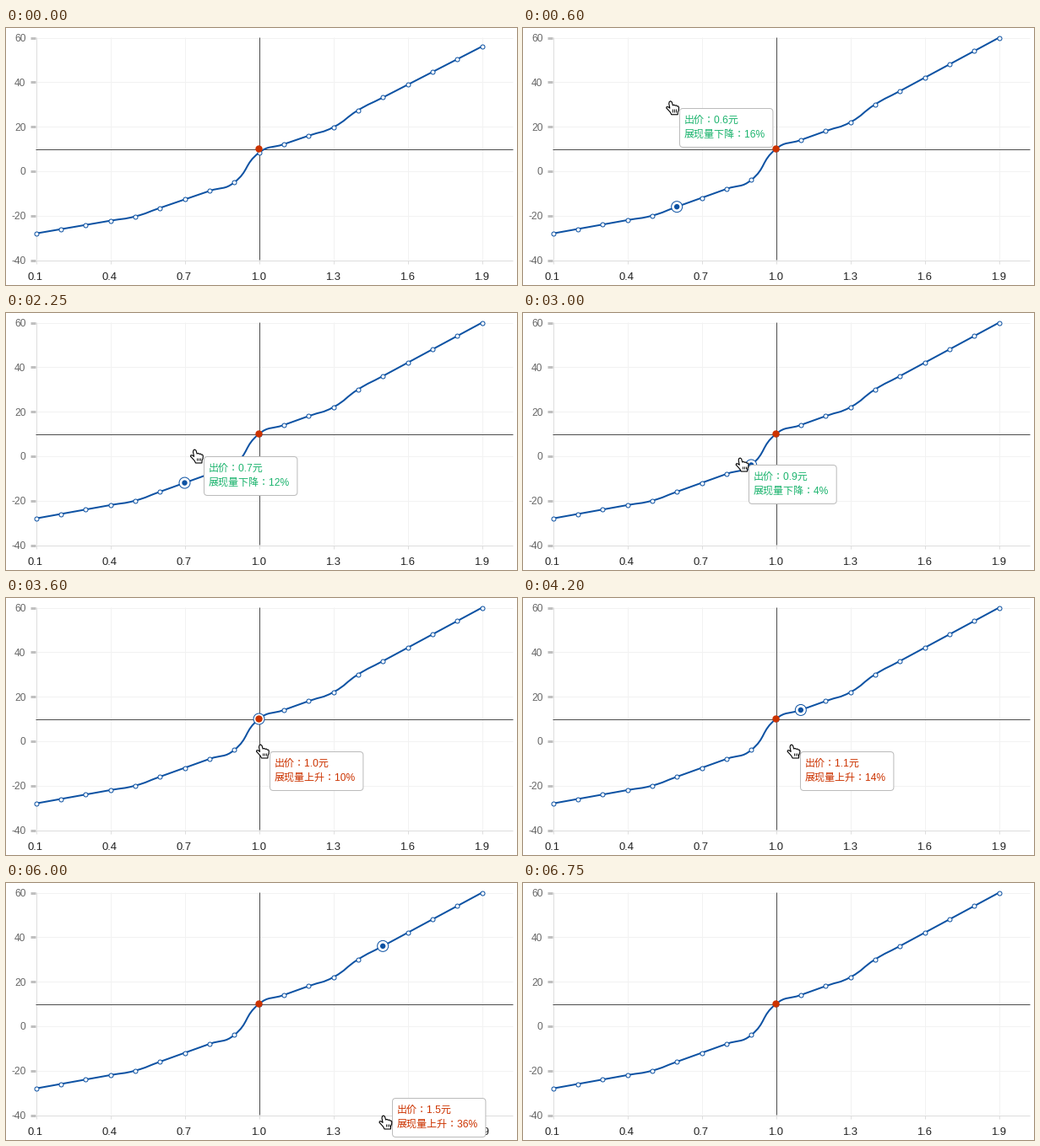
A matplotlib script that plays this animation: 605 by 305 pixels, repeating every 7.86 s.

```python
import numpy as np
import matplotlib.pyplot as plt
from matplotlib.animation import FuncAnimation
from matplotlib.patches import Circle, FancyBboxPatch, PathPatch, Polygon
from matplotlib.path import Path

W, H, DPI = 605, 305, 64
PX = 72 / DPI  # points per pixel
LOOP, INTERVAL, STEP = 7860, 30, 150

BLUE, RED, GREEN = "#0d52a3", "#cc3300", "#1cb46e"
DARK, GRID = "#4d4d4d", "#f2f2f2"

VALUES = np.array([-28, -26, -24, -22, -20, -16, -12, -8, -4, 10,
                   14, 18, 22, 30, 36, 42, 48, 54, 60], float)
XS = 35.5 + 88 / 3 * np.arange(len(VALUES))

# pointer waypoints: time, x, y
PATH = np.array([
    (450, 160, 70), (1050, 219, 137), (1500, 219, 137), (2250, 223.5, 162),
    (2550, 235, 171), (2700, 235, 171), (3600, 301.5, 174), (3750, 303.5, 174),
    (4800, 337.5, 174), (5550, 337.5, 174), (6000, 447, 276),
    (6150, 450, 276), (6300, 450, 276), (6600, 451, 296),
])
POINTER_ON, HOVER_OFF, POINTER_OFF = 450, 6600, 6750

HAND = np.array([
    (-1.5, .8), (0, 0), (1.5, 1.2), (2.6, 5), (4.2, 4.4), (5.4, 5.4),
    (6.8, 5), (7.8, 6.2), (9, 6), (9.8, 7.4), (9.6, 10.5), (8.6, 13),
    (8.4, 16), (1, 16), (-.2, 13.5), (-2.8, 10.5), (-5, 8.2), (-4.6, 6.8),
    (-3, 6.8), (-.9, 8.4), (-2, 3),
])


def to_y(value):
    return 169.9 - 2.64 * value


def smooth_path(points):
    """Cubic Bezier through points, handles weighted by segment length."""
    lengths = np.hypot(*np.diff(points, axis=0).T)
    verts = [points[0], points[0]]
    for i in range(1, len(points) - 1):
        tangent = (points[i + 1] - points[i - 1]) / 2
        ratio = lengths[i] / (lengths[i - 1] + lengths[i])
        verts += [points[i] - tangent * (1 - ratio), points[i],
                  points[i] + tangent * ratio]
    verts += [points[-1], points[-1]]
    return Path(verts, [Path.MOVETO] + [Path.CURVE4] * (len(verts) - 1))


fig = plt.figure(figsize=(W / DPI, H / DPI), dpi=DPI, facecolor="white")
ax = fig.add_axes([0, 0, 1, 1])
ax.set_xlim(0, W)
ax.set_ylim(H, 0)
ax.axis("off")


def line(x, y, color, width=1, z=1):
    return ax.plot(x, y, color=color, lw=width * PX, zorder=z,
                   solid_capstyle="butt")[0]


def label(x, y, text, size, color, align, z=1):
    return ax.text(x, y, text, fontsize=size * PX, color=color, ha=align,
                   va="baseline", zorder=z,
                   family=["Liberation Sans", "Noto Sans CJK JP"])


def disc(radius, face, edge="none", z=5):
    return ax.add_patch(Circle((0, 0), radius, fc=face, ec=edge,
                               lw=PX, zorder=z))


for value in range(-40, 61, 20):
    y = to_y(value)
    line([35, 600], [y, y], "#dddddd" if value == -40 else GRID)
    line([29, 35], [y, y], "#c0c0c0", 3)
    label(23.5, y + 4.5, str(value), 12, "#666666", "right")

for i in range(0, len(XS), 3):
    line([XS[i]] * 2, [11, 275], "#dddddd" if i == 0 else GRID)
    line([XS[i]] * 2, [276, 280], "#dddddd")
    label(XS[i] - .5, 299, f"{(i + 1) / 10:.1f}", 13, "#222222", "center")

line([35, 600], [to_y(10)] * 2, DARK, z=2)
line([XS[9]] * 2, [11, 275], DARK, z=2)

curve = ax.add_patch(PathPatch(Path([(0, 0), (1, 1)]), fc="none", ec=BLUE,
                               lw=2 * PX, zorder=3))
dots = ax.plot([], [], "o", ms=5 * PX, mfc="white", mec=BLUE, mew=PX,
               zorder=4)[0]
ring = [disc(6.5, "white", BLUE), disc(3.2, BLUE, z=6)]
marker = disc(4.2, RED, z=7)
marker.center = XS[9], to_y(10)

box = ax.add_patch(FancyBboxPatch(
    (0, 0), 110, 46, boxstyle="round,pad=0,rounding_size=4",
    fc="white", ec="#bbbbbb", lw=PX, zorder=8))
rows = [label(0, 0, "", 12, GREEN, "left", 9) for _ in range(2)]

hand = ax.add_patch(Polygon(HAND, fc="white", ec="black", lw=1.1 * PX,
                            joinstyle="round", zorder=10))
creases = [line([], [], "black", .9, 11) for _ in range(3)]


def draw_curve(t):
    growth = np.interp(t, [0, 150, 300], [.955, .99, 1])
    ys = to_y(VALUES[0] + (VALUES - VALUES[0]) * growth)
    curve.set_path(smooth_path(np.column_stack([XS, ys])))
    dots.set_data(XS, ys)


def draw_hover(x, y):
    i = int(np.argmin(abs(XS - x)))
    for part in ring:
        part.center = XS[i], to_y(VALUES[i])

    rising = VALUES[i] > 0
    amount = f"{abs(VALUES[i]):.0f}"
    left, top = round(x + 10) + .5, min(round(y + 8), 255) + .5
    box.set_bounds(left, top, 97 + 6.7 * len(amount), 46)
    texts = (f"出价：{(i + 1) / 10:.1f}元",
             f"展现量{'上升' if rising else '下降'}：{amount}%")
    for k, (row, text) in enumerate(zip(rows, texts)):
        row.set_text(text)
        row.set_color(RED if rising else GREEN)
        row.set_position((left + 5.5, top + 17.5 + 17 * k))


def draw_pointer(x, y):
    hand.set_xy(HAND + (x, y))
    for k, crease in enumerate(creases):
        crease.set_data([x + 2.5 + 2.1 * k] * 2, [y + 9.5, y + 13])


def update(frame):
    t = frame * INTERVAL // STEP * STEP
    x, y = (np.interp(t, PATH[:, 0], PATH[:, k]) for k in (1, 2))
    draw_curve(t)
    draw_hover(x, y)
    draw_pointer(x, y)
    for part in [*ring, box, *rows]:
        part.set_visible(POINTER_ON <= t < HOVER_OFF)
    for part in [hand, *creases]:
        part.set_visible(POINTER_ON <= t < POINTER_OFF)
    return []


anim = FuncAnimation(fig, update, frames=LOOP // INTERVAL, interval=INTERVAL,
                     init_func=lambda: update(0), repeat=True, repeat_delay=0)
plt.show()
```
